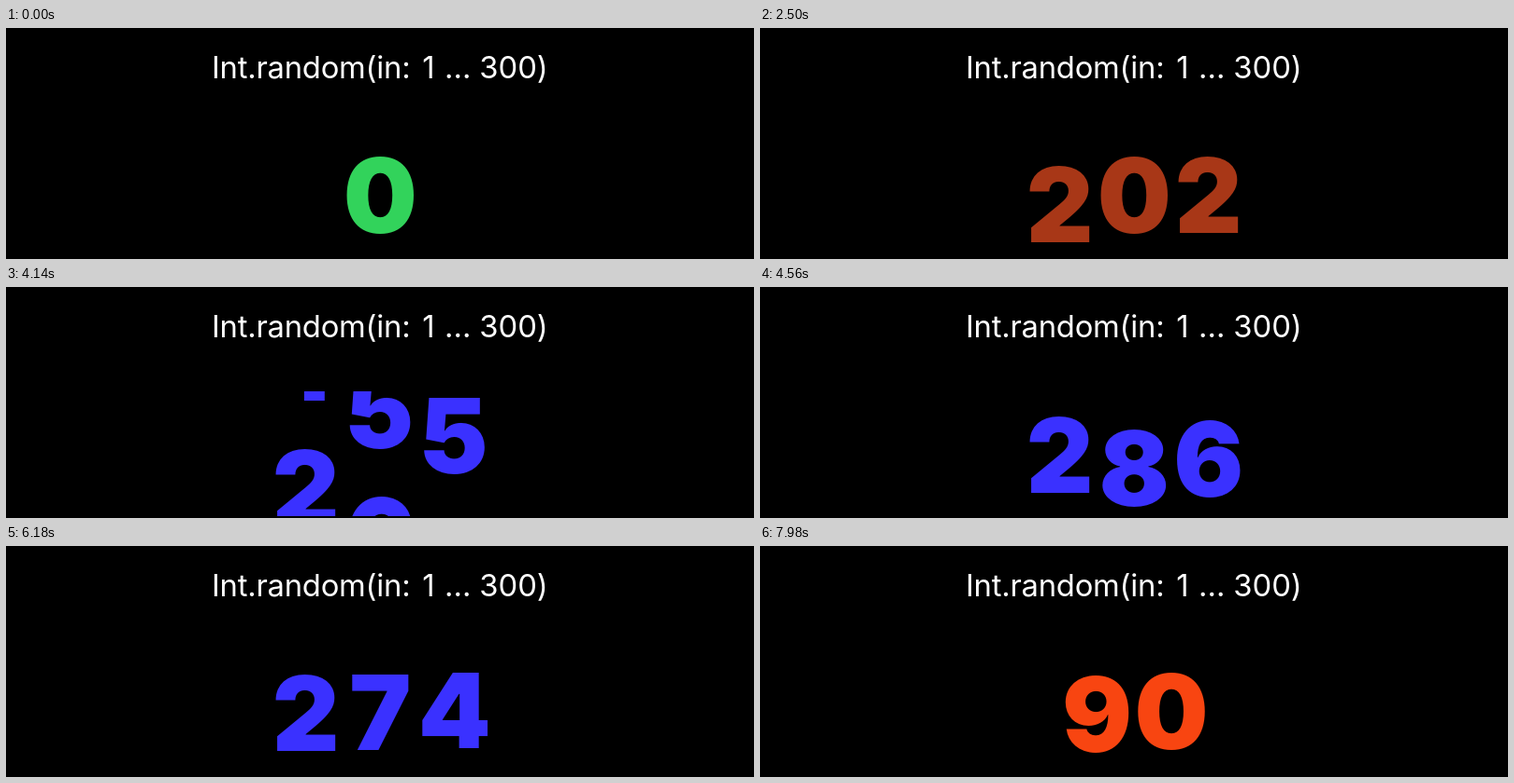
An HTML page that plays this animation: 800x248 px, repeating every 8000 ms.

```html
<!DOCTYPE html>
<html lang="en">
<head>
<meta charset="utf-8">
<title>Rolling number</title>
<style>
  html, body { margin: 0; width: 100%; height: 100%; overflow: hidden; background: #000; }
  svg { display: block; width: 800px; height: 248px; }
  text {
    font-family: Inter, "Liberation Sans", sans-serif;
    font-optical-sizing: none;
    font-feature-settings: "calt" 0;
  }
  .title { font-size: 32.8px; fill: #fff; }
  .digit { font-size: 111.2px; font-weight: 900; text-anchor: middle; }
</style>
</head>
<body>
<svg viewBox="0 0 800 248">
  <clipPath id="window"><rect y="112" width="800" height="134"/></clipPath>
  <text class="title" y="53.5"><tspan x="220" letter-spacing="-0.24">Int.random(in:</tspan> <tspan x="445.2">1</tspan> <tspan x="469" letter-spacing="0.1">...</tspan> <tspan x="506.2">300)</tspan></text>
  <g clip-path="url(#window)"><g id="counter"></g></g>
</svg>
<script>
const LOOP = 8000, ROW = 134, PITCH = 79.5, BASE = 219.8, RATE = 0.0093;
const NS = 'http://www.w3.org/2000/svg';

// at: colour and digit count change; starts: when each column begins to roll
const rolls = [
  { at: 0,    value: '0',   color: '#32d35b', starts: [0, 0, 0] },
  { at: 500,  value: '202', color: '#8a9148', starts: [640, 575, 510] },
  { at: 2390, value: '103', color: '#a83717', starts: [2450, 2485, 2520] },
  { at: 3780, value: '286', color: '#3a31ff', starts: [3861, 3893, 3869] },
  { at: 5420, value: '274', color: '#3a31ff', starts: [5450, 5460, 5470] },
  { at: 7000, value: '90',  color: '#f84511', starts: [7050, 7066, 7066] }
];

const counter = document.getElementById('counter');

function make(tag, parent) {
  return parent.appendChild(document.createElementNS(NS, tag));
}

const columns = [0, 1, 2].map(() => {
  const strip = make('g', counter);
  for (let d = 0; d < 10; d++) {
    const text = make('text', strip);
    text.setAttribute('class', 'digit');
    text.setAttribute('y', BASE + d * ROW);
    text.textContent = d;
  }
  return strip;
});

// Critically damped spring from 0 to 1
function spring(ms) {
  const x = Math.max(0, ms) * RATE;
  return 1 - (1 + x) * Math.exp(-x);
}

function easeIn(ms) {
  const p = Math.min(1, Math.max(0, ms / 100));
  return p * p;
}

function digitAt(col, t) {
  let from = 0, pos = 0;
  for (const { value, starts } of rolls) {
    const to = col < value.length ? +value[col] : from;
    pos += (to - from) * spring(t - starts[col]);
    from = to;
  }
  return pos;
}

function draw(t) {
  let count = 1, before = 1;
  for (const { at, value } of rolls) {
    count += (value.length - before) * easeIn(t - at);
    before = value.length;
  }
  const current = rolls.filter(r => r.at <= t).pop();
  counter.setAttribute('fill', current.color);

  columns.forEach((strip, col) => {
    const x = 400.3 + (col - (count - 1) / 2) * PITCH;
    const y = -digitAt(col, t) * ROW;
    strip.setAttribute('transform', `translate(${x.toFixed(2)} ${y.toFixed(2)})`);
    strip.setAttribute('opacity', Math.min(1, Math.max(0, count - col)));
  });
}

let origin = null;
function tick(now) {
  if (origin === null) origin = now;
  draw(Math.max(0, now - origin) % LOOP);
  requestAnimationFrame(tick);
}
draw(0);
requestAnimationFrame(tick);
</script>
</body>
</html>
```
